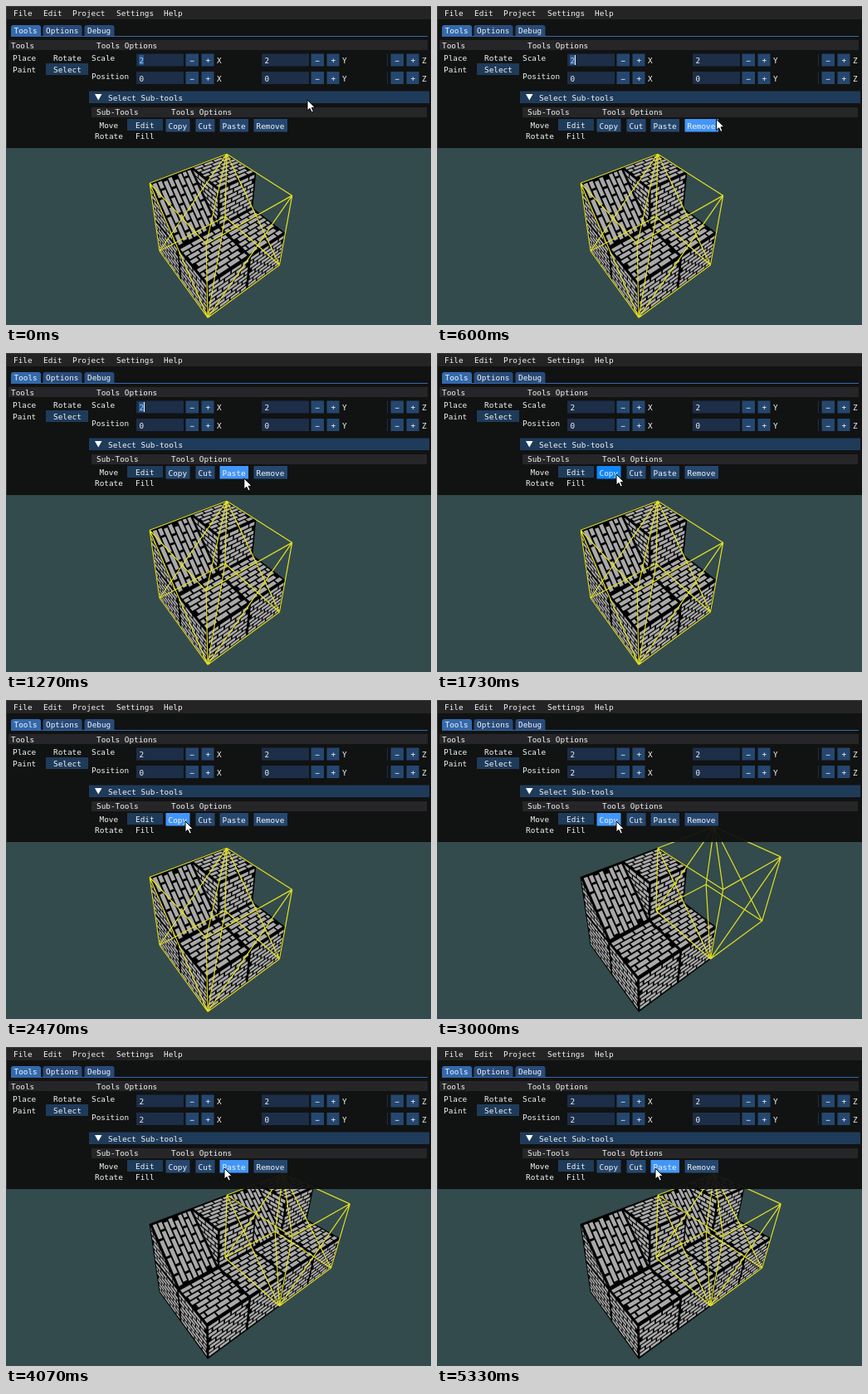
Write an HTML page with a canvas that moves like this. It is 512 px wide and 384 px high and loops after 5390 ms.

```html
<!DOCTYPE html>
<html lang="en">
<head>
<meta charset="utf-8">
<title>Voxel editor: copy and paste</title>
<style>
  html, body { margin: 0; width: 100%; height: 100%; overflow: hidden; background: #334b4c; }
  canvas { display: block; }
</style>
</head>
<body>
<canvas id="stage" width="512" height="384"></canvas>
<script>
const ctx = document.getElementById('stage').getContext('2d');
const LOOP = 5390;
const COPY_DOWN = 1670, COPY_UP = 1850, STEP_1 = 2700, STEP_2 = 2880, PASTE_DOWN = 3780, PASTE_UP = 3920;
const BUTTON = '#25476f', HEADER = '#1f3b5a', FIELD = '#1c2e48', TABLE_HEAD = '#262629', BORDER = '#3b3b43';

// Cursor keys: time, x, y
const cursorKeys = [
  [0, 363, 113], [250, 363, 113], [880, 318, 153], [1080, 318, 153],
  [1600, 216, 146], [3130, 216, 146], [3640, 263, 146], [LOOP, 263, 146]
];

function cursorAt(t) {
  const i = cursorKeys.findIndex(key => key[0] > t);
  const [t0, x0, y0] = cursorKeys[i - 1], [t1, x1, y1] = cursorKeys[i];
  const s = (t - t0) / (t1 - t0), e = s * s * (3 - 2 * s);
  return [x0 + (x1 - x0) * e, y0 + (y1 - y0) * e];
}

// ---- scene: coordinates in blocks, x right-up, y up, z towards the viewer
function project([x, y, z]) {
  const a = 0.078 * x, b = -0.077 * y, c = -0.1025 * z, w = 1 + a + b + c;
  return [(185 + 770 * a + 250.7 * b - 40 * c) / w, (295 - 12 * a + 744 * b - 16 * c) / w];
}

function trace(points) {
  ctx.beginPath();
  points.forEach(p => ctx.lineTo(...project(p)));
  ctx.closePath();
}

// Bricks lie along u, rows are stacked along v
function brickFace(origin, u, v, triangle) {
  const at = (s, t) => origin.map((o, i) => o + u[i] * s + v[i] * t);
  const rows = 8, length = 0.27, gap = 0.035, rim = 0.03;
  const pitch = (1 - 2 * rim) / rows;
  const inside = s => Math.min(1 - rim, Math.max(rim, s));
  ctx.save();
  trace(triangle ? [at(0, 0), at(1, 0), at(0, 1)] : [at(0, 0), at(1, 0), at(1, 1), at(0, 1)]);
  ctx.fillStyle = ctx.strokeStyle = '#000';
  ctx.lineWidth = 0.8;
  ctx.fill();
  ctx.stroke();
  if (triangle) ctx.clip();
  ctx.fillStyle = '#a9a9a9';
  for (let row = 0; row < rows; row++) {
    const t0 = rim + (row + 0.14) * pitch, t1 = t0 + 0.72 * pitch;
    for (let s = -(row * 0.43 % 1) * length; s < 1; s += length) {
      const s0 = inside(s + gap / 2), s1 = inside(s + length - gap / 2);
      if (s1 - s0 < 0.03) continue;
      trace([at(s0, t0), at(s1, t0), at(s1, t1), at(s0, t1)]);
      ctx.fill();
    }
  }
  ctx.restore();
}

function cube(x, y, z) {
  brickFace([x, y, z], [0, 0, 1], [0, 1, 0]);
  brickFace([x, y + 1, z], [1, 0, 0], [0, 0, 1]);
  brickFace([x, y, z + 1], [1, 0, 0], [0, 1, 0]);
}

function ramp(x, y, z) {
  brickFace([x, y, z], [0, 0, 1], [0, 1, 0], true);
  brickFace([x, y + 1, z], [0, -1, 1], [1, 0, 0]);
}

// Drawn from far to near
function model(x) {
  cube(x + 1, 0, 0);
  cube(x + 1, 1, 0);
  cube(x + 1, 0, 1);
  cube(x, 0, 0);
  ramp(x, 1, 0);
  cube(x, 0, 1);
}

function selectionBox(x) {
  const corner = i => [x + (i & 1) * 2, i & 2, (i & 4) / 2];
  const line = (i, j) => {
    ctx.moveTo(...project(corner(i)));
    ctx.lineTo(...project(corner(j)));
  };
  ctx.beginPath();
  for (let i = 0; i < 8; i++)
    for (const bit of [1, 2, 4]) if (!(i & bit)) line(i, i | bit);
  for (const j of [6, 0, 5]) line(3, j);
  for (const j of [2, 7, 1]) line(4, j);
  ctx.strokeStyle = '#e2df24';
  ctx.lineWidth = 1.2;
  ctx.stroke();
}

// ---- interface
function box(x0, y0, x1, y1, color, radius = 0) {
  ctx.fillStyle = color;
  ctx.beginPath();
  ctx.roundRect(x0, y0, x1 - x0, y1 - y0, radius);
  ctx.fill();
}

function text(label, x, y) {
  ctx.fillStyle = '#f4f4f4';
  ctx.fillText(label, x, y);
}

function numberField(x, y, value, axis) {
  if (value === null) box(459, y, 460, y + 15, FIELD);
  else {
    box(x, y, x + 57, y + 15, FIELD);
    text(value, x + 3.5, y + 11.5);
  }
  box(x + 59.5, y, x + 75, y + 15, BUTTON);
  box(x + 78.5, y, x + 93.5, y + 15, BUTTON);
  text('\u2212', x + 64.5, y + 11.5);
  text('+', x + 83.5, y + 11.5);
  text(axis, x + 97, y + 11.5);
}

function actionButton(label, x0, x1, [mx, my], pressed) {
  const hovered = mx >= x0 && mx < x1 && my >= 136 && my < 151;
  box(x0, 136, x1, 151.5, hovered ? (pressed ? '#0f87fa' : '#4296fa') : BUTTON);
  text(label, x0 + 3, 147.5);
}

function panel(t, mouse, shift) {
  ctx.font = '9.35px "DejaVu Sans Mono", monospace';
  box(0, 0, 512, 171, 'rgba(15,15,15,.94)');
  box(0, 0, 512, 16, '#242424');
  box(0, 0, 512, 1, BORDER);
  box(0, 0, 1, 171, BORDER);
  [['File', 9], ['Edit', 45], ['Project', 80], ['Settings', 133], ['Help', 190]]
    .forEach(([label, x]) => text(label, x, 11.5));

  [['Tools', 6, 42], ['Options', 44.5, 91.5], ['Debug', 94.5, 130.5]].forEach(([label, x0, x1], i) => {
    box(x0, 23, x1, 37, i ? '#284a78' : '#3369ad', [3, 3, 0, 0]);
    text(label, x0 + 3.5, 33);
  });
  box(6, 36, 508, 37, '#3369ad');

  box(3, 41, 508, 53, TABLE_HEAD);
  text('Tools', 6, 51);
  text('Tools Options', 109, 51);
  box(48, 69, 99, 83, HEADER);
  text('Place', 8, 66);
  text('Rotate', 57, 66);
  text('Paint', 8, 79.5);
  text('Select', 57, 79.5);

  text('Scale', 103, 66);
  text('Position', 103, 88);
  [[157, 'X', 2, shift], [308, 'Y', 2, 0], [404, 'Z', null, null]].forEach(([x, axis, scale, position]) => {
    numberField(x, 57.5, scale, axis);
    numberField(x, 79, position, axis);
  });
  if (t < COPY_DOWN) {
    box(160, 59, 166, 71, 'rgba(66,150,250,.4)');
    if (t > 600 && t < 1400) box(166, 59, 167, 71, '#f4f4f4');
  }

  box(100, 102.5, 510, 117, HEADER);
  ctx.fillStyle = '#fff';
  ctx.beginPath();
  ctx.moveTo(107, 106);
  ctx.lineTo(115.5, 106);
  ctx.lineTo(111.2, 113.5);
  ctx.fill();
  text('Select Sub-tools', 123, 113.5);

  box(103, 122, 507, 134, TABLE_HEAD);
  text('Sub-Tools', 109, 131);
  text('Tools Options', 199, 131);
  box(146, 136, 189, 150, HEADER);
  text('Move', 112.5, 146.5);
  text('Edit', 156, 146.5);
  text('Rotate', 107, 160);
  text('Fill', 156, 160);
  actionButton('Copy', 192.5, 221.5, mouse, t >= COPY_DOWN && t < COPY_UP);
  actionButton('Cut', 228.5, 251.5, mouse);
  actionButton('Paste', 257.5, 292, mouse, t >= PASTE_DOWN && t < PASTE_UP);
  actionButton('Remove', 298.5, 339, mouse);
}

function pointer([x, y]) {
  const shape = [[0, 0], [0, 13], [3, 10.3], [5.2, 15], [7.4, 14], [5.3, 9.4], [9.3, 9.2]];
  ctx.beginPath();
  shape.forEach(([dx, dy]) => ctx.lineTo(x + dx, y + dy));
  ctx.closePath();
  ctx.fillStyle = '#fff';
  ctx.strokeStyle = '#000';
  ctx.lineWidth = 1;
  ctx.fill();
  ctx.stroke();
}

function draw(now) {
  const t = now % LOOP, mouse = cursorAt(t);
  const shift = t < STEP_1 ? 0 : t < STEP_2 ? 1 : 2;
  box(0, 0, 512, 384, '#334b4c');
  if (t >= PASTE_UP) model(2);
  model(0);
  selectionBox(shift);
  panel(t, mouse, shift);
  pointer(mouse);
  requestAnimationFrame(draw);
}
requestAnimationFrame(draw);
</script>
</body>
</html>
```
